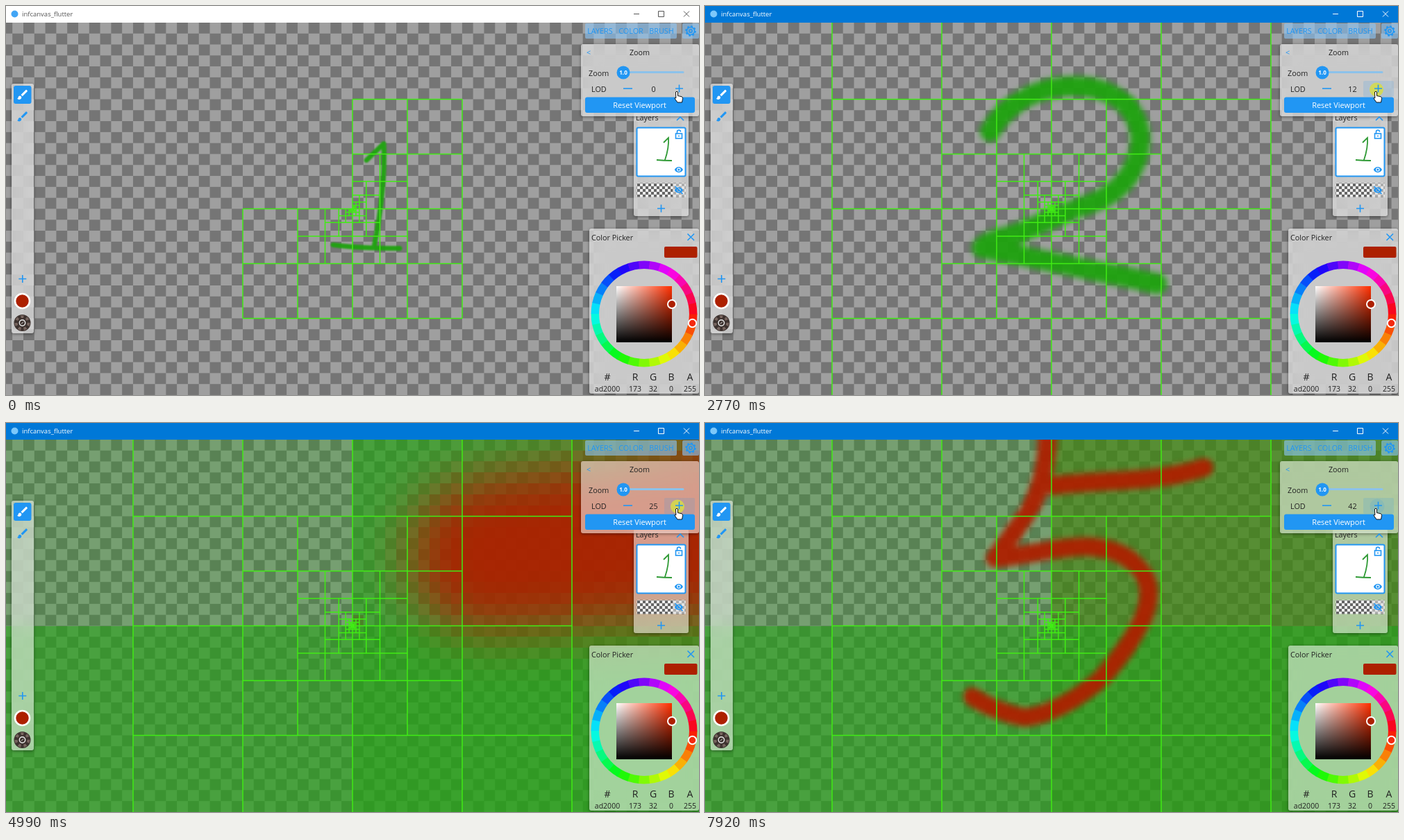
Write an HTML page with a canvas that moves like this. It is 998 px wide and 561 px high and loops after 7990 ms.

```html
<!DOCTYPE html>
<html>
<head>
<meta charset="utf-8">
<style>
html, body { margin: 0; width: 100%; height: 100%; overflow: hidden; }
body { position: relative; font-family: "Open Sans", sans-serif; }
body > * { position: absolute; }
#view {
  left: 0; top: 24px;
  background: repeating-conic-gradient(#757575 0 25%, #9f9f9f 0 50%) 25px 15.7px / 31.6px 31.6px;
}
.panel {
  background: rgba(255, 255, 255, .54); backdrop-filter: blur(14px);
  border-radius: 3px; box-shadow: 0 1px 4px rgba(0, 0, 0, .45);
}
.tab { background: rgba(142, 200, 250, .6); border-radius: 2px; }
#square {
  left: 879px; top: 404px; width: 80px; height: 81px;
  background: linear-gradient(transparent, #000), linear-gradient(90deg, #fff, #ff2f00);
}
#ui { left: 0; top: 0; }
.line { fill: none; stroke: #2196f3; stroke-width: 1.6; }
.blue { fill: #2196f3; }
.mid { text-anchor: middle; }
</style>
</head>
<body>
<canvas id="view" width="998" height="537"></canvas>
<div class="panel" style="left:904px;top:153px;width:79px;height:150px"></div>
<div class="panel" style="left:828px;top:55px;width:170px;height:104px"></div>
<div class="panel" style="left:840px;top:321px;width:158px;height:238px"></div>
<div class="panel" style="left:8px;top:112px;width:32px;height:360px"></div>
<div class="tab" style="left:834px;top:25px;width:132px;height:22px"></div>
<div class="tab" style="left:974px;top:25px;width:24px;height:22px"></div>
<div id="square"></div>

<svg id="ui" width="998" height="561" font-size="10.8" fill="#222">
  <defs>
    <path id="brush" d="M7 14c-1.7 0-3 1.3-3 3 0 1.3-1.2 2-2 2 .9 1.2 2.5 2 4 2 2.2 0 4-1.8 4-4 0-1.7-1.3-3-3-3zm13.7-9.4l-1.3-1.3c-.4-.4-1-.4-1.4 0L9 12.2 11.8 15l9-9c.3-.4.3-1-.1-1.4z"/>
    <path id="eye" fill-rule="evenodd" d="M12 4.5C7 4.5 2.7 7.6 1 12c1.7 4.4 6 7.5 11 7.5s9.300-3.100 11-7.500C21.300 7.600 17 4.500 12 4.500zM12 17a5 5 0 1 1 0-10 5 5 0 0 1 0 10zm0-8a3 3 0 1 0 0 6 3 3 0 0 0 0-6z"/>
    <path id="plus" class="line" d="M-5.500 0h11M0-5.500v11"/>
    <pattern id="tiny" width="8" height="8" x="909" y="256" patternUnits="userSpaceOnUse">
      <path fill="#eee" d="M0 0h8v8H0z"/><path fill="#666" d="M0 0h4v4H0zM4 4h4v4H4z"/>
    </pattern>
  </defs>

  <rect id="bar" width="998" height="24"/>
  <circle id="logo" cx="12.500" cy="11.500" r="5"/>
  <g id="caption">
    <text x="23" y="15" font-size="9.500">infcanvas_flutter</text>
    <path fill="none" stroke="currentColor" d="M904 11.500h8M939.500 7.500h8v8h-8zM976 7.500l8 8m0-8l-8 8"/>
  </g>

  <g class="blue mid" font-size="10.800">
    <text x="855.500" y="40">LAYERS</text><text x="900" y="40">COLOR</text><text x="944" y="40">BRUSH</text>
  </g>
  <g class="line" transform="translate(986 36)">
    <circle r="5.500"/><circle r="2.200"/><circle r="6.800" stroke-width="2" stroke-dasharray="2.670"/>
  </g>

  <text class="blue" x="836" y="71">&lt;</text>
  <text class="mid" x="912.500" y="71">Zoom</text>
  <text x="839" y="100.500">Zoom</text>
  <path stroke="#8cc2ea" stroke-width="3" stroke-linecap="round" d="M892 95.500h83"/>
  <circle class="blue" cx="889" cy="96" r="9.500"/>
  <text class="mid" x="889" y="99" font-size="8" font-weight="700" fill="#fff">1.0</text>
  <text x="843" y="124">LOD</text>
  <path class="line" d="M889 119h13"/>
  <text id="lod" class="mid" x="932.500" y="124"></text>
  <rect id="hover" class="blue" x="948" y="108" width="44" height="23" rx="2" opacity=".14"/>
  <circle id="splash" class="blue" cx="968" cy="120" r="10.500" opacity=".13"/>
  <circle id="press" cx="967" cy="120.500" r="10" fill="#d8dc46" opacity=".85"/>
  <use href="#plus" x="969.500" y="119"/>
  <rect class="blue" x="834" y="131.500" width="158" height="22.500" rx="3"/>
  <text class="mid" x="912.500" y="147" fill="#fff" font-size="11">Reset Viewport</text>

  <svg x="904" y="159" width="79" height="20"><text x="3" y="5.500">Layers</text><path class="line" d="M62 6l5-5 5 5"/></svg>
  <rect x="908.500" y="175.500" width="70" height="70" rx="2" fill="#fff" stroke="#2196f3" stroke-width="2"/>
  <path fill="none" stroke="#2f9a35" stroke-width="1.800" d="M947 197l7-7q1 14-5 32M937 222q10 1 22 1"/>
  <g class="line" stroke-width="1.300"><rect x="964.500" y="184" width="9" height="7"/><path d="M966.500 184v-2.500a2.500 2.500 0 0 1 5 0M968 187.500h2"/></g>
  <use href="#eye" class="blue" transform="translate(962.300 229.500) scale(.55)"/>
  <rect x="908.500" y="255.500" width="70" height="20" fill="url(#tiny)"/>
  <rect x="960" y="256" width="18.500" height="19" fill="#ddd" opacity=".6"/>
  <use href="#eye" class="blue" transform="translate(962.300 259) scale(.55)"/>
  <path class="line" d="M963.500 260l11 11"/>
  <use href="#plus" x="943.500" y="292"/>

  <rect class="blue" x="11" y="115" width="25.500" height="26" rx="3"/>
  <use href="#brush" fill="#fff" transform="translate(14.500 118.500) scale(.78)"/>
  <use href="#brush" class="blue" transform="translate(14.500 150) scale(.78)"/>
  <use href="#plus" x="23.800" y="393.500"/>
  <circle cx="23.500" cy="425.500" r="10.500" fill="#ad2000" stroke="#fff" stroke-width="2.600"/>
  <circle cx="23.500" cy="457" r="12" fill="#3d322f"/>
  <circle cx="23.500" cy="457" r="9" fill="none" stroke="#77655f" stroke-width="4" stroke-dasharray="4"/>
  <circle cx="23.500" cy="457" r="4.200" fill="none" stroke="#eee" stroke-width="1.400"/>
  <path stroke="#eee" d="M22 458.500l3-3"/>

  <text x="843" y="338">Color Picker</text>
  <path class="line" d="M981.500 328.500l9.500 9.500m0-9.500l-9.500 9.500"/>
  <rect x="948" y="347" width="47.500" height="16" rx="2" fill="#ad2000"/>
  <g id="ring" fill="none" stroke-width="11.500"></g>
  <g stroke="#fff" stroke-width="2">
    <circle cx="988.500" cy="457.500" r="5.700" fill="#f42a10"/><circle cx="959" cy="430" r="6" fill="#ad2000"/>
  </g>
  <g class="mid" id="values"></g>

  <path fill="#fff" stroke="#111" d="M965 123.500q1.500-1.500 3 0v5.500l5.500 1.200q1.800.6 1.500 3l-1 5.300h-6.500l-4.200-6q.8-1.800 2 0z" transform="translate(-.5 .5)"/>
</svg>

<script>
const $ = id => document.getElementById(id);
const ctx = $("view").getContext("2d");
const CX = 499, CY = 268.5, TEXEL = .494, HALF = 210, LOOP = 7990;
const GREEN = "rgb(30,163,14)", RED = "rgb(173,32,0)";

// Each digit lives ten zoom levels below the previous one.
// core: opacity of the four texels touching the zoom centre.
const digits = [
  { level: 0, color: GREEN, width: 7, core: [0, 0, 0, 0],
    d: "M20-70L45-94C47-55 42 0 31 55M-28 52Q10 57 68 57" },
  { level: 10, color: GREEN, width: 7.4, core: [.31, .67, .66, .78],
    d: "M-22-28C-10-50 30-50 32-26C32-8 16-2 9.9-.5C4 1.500-8 8-15.600 9.900Q-22 11-25 14L38 27" },
  { level: 20, color: RED, width: 7, core: [0, .14, 0, .02],
    d: "M-16-43C5-52 44-55 45-32C45-14 25-5 6-3.200C24-5 38-4 38 14C36 30-5 35-37 36" },
  { level: 30, color: RED, width: 6.2, core: [0, 0, 0, 0],
    d: "M0-42C-4-34-6-26-8.800-16.800L-14.800 0L-21.500 16.800L-31 28Q10 27 55 22M37.500 3L39 52" },
  { level: 40, color: RED, width: 6.6, core: [0, 0, 0, 0],
    d: "M-1.500-72C-1-58-4-48-9-40L-20.300-24.400C-5-26 4-29 13-28.600C28-28 36-19 35-10C34 0 24 12 18 19C10 26-2 33-10 33Q-20 31-28.500 25.600M0-50.500C18-53 36-51 55-57" },
];

function paintTexture({ color, width, core, d }) {
  const canvas = document.createElement("canvas");
  canvas.width = canvas.height = HALF * 2;
  const c = canvas.getContext("2d");
  c.translate(HALF, HALF);
  c.save();
  c.scale(1 / TEXEL, 1 / TEXEL);
  c.lineCap = c.lineJoin = "round";
  c.strokeStyle = color;
  c.lineWidth = width;
  c.globalAlpha = .95;
  c.filter = "blur(2px)";
  c.stroke(new Path2D(d));
  c.restore();
  c.clearRect(-1, -1, 2, 2);
  c.fillStyle = color;
  core.forEach((alpha, i) => {
    c.globalAlpha = alpha;
    c.fillRect(i % 2 - 1, (i >> 1) - 1, 1, 1);
  });
  return canvas;
}
for (const digit of digits) digit.texture = paintTexture(digit);

function drawDigit({ level, texture }, lod) {
  if (lod < level - 7) return;
  const scale = TEXEL * 2 ** Math.min(lod - level, 11);
  ctx.imageSmoothingEnabled = scale < 1;
  ctx.imageSmoothingQuality = "high";
  ctx.drawImage(texture, HALF - CX / scale, HALF - CY / scale, 998 / scale, 537 / scale, 0, 0, 998, 537);
}

// Nested rings of tiles; one quadrant at a time, growing out to its limit.
function drawGrid(lod) {
  const outer = Math.min(316, 158 * 2 ** lod);
  const topLeft = Math.min(316, 39.5 * 2 ** (lod - 8));
  ctx.beginPath();
  for (const [sx, sy] of [[1, 1], [1, -1], [-1, 1], [-1, -1]]) {
    const line = (x1, y1, x2, y2) => {
      ctx.moveTo(CX + sx * x1, CY + sy * y1);
      ctx.lineTo(CX + sx * x2, CY + sy * y2);
    };
    const limit = sx + sy < 0 ? topLeft : outer;
    line(0, 0, limit, 0);
    line(0, 0, 0, limit);
    for (let h = limit; h > 1; h /= 2) {
      line(h, 0, h, h);
      line(0, h, h, h);
      line(h / 2, h / 2, h / 2, h);
      line(h / 2, h / 2, h, h / 2);
    }
  }
  ctx.strokeStyle = "#40ec14";
  ctx.lineWidth = 1.5;
  ctx.stroke();
}

// [ms, clicks]: a click is held during the second half of each unit.
const pace = [[200, .5], [2040, 8.6], [3180, 15.2], [3990, 20.2], [4990, 25.7], [6620, 34.7], [7990, 42.7]];
function clicksAt(t) {
  if (t < 200) return 0;
  const i = pace.findIndex(([end]) => t < end);
  const [t0, a] = pace[i - 1], [t1, b] = pace[i];
  return a + (b - a) * (t - t0) / (t1 - t0);
}

const show = (id, on) => $(id).style.display = on ? "" : "none";

function frame(now) {
  const t = now % LOOP, clicks = clicksAt(t), lod = Math.floor(clicks);
  const active = t >= 200, held = active && clicks % 1 >= .5;
  ctx.clearRect(0, 0, 998, 537);
  for (const digit of digits) drawDigit(digit, lod);
  drawGrid(lod);
  $("lod").textContent = lod;
  $("bar").style.fill = active ? "#0078d7" : "#fff";
  $("logo").style.fill = active ? "#7cc8fa" : "#42a5f5";
  $("caption").style.fill = $("caption").style.color = active ? "#fff" : "#555";
  show("hover", active);
  show("splash", active && !held);
  show("press", held);
  requestAnimationFrame(frame);
}

const STEP = 12;
for (let a = 0; a < 360; a += STEP) {
  const at = deg => [919 + 70.7 * Math.cos(deg * Math.PI / 180), 444 + 70.7 * Math.sin(deg * Math.PI / 180)];
  $("ring").innerHTML += `<path stroke="hsl(${a + STEP / 2} 95% 50%)" d="M${at(a)}A70.7 70.7 0 0 1 ${at(a + STEP + .4)}"/>`;
}
[["#", "ad2000", 866], ["R", 173, 906], ["G", 32, 932], ["B", 0, 958], ["A", 255, 985]].forEach(([name, value, x]) =>
  $("values").innerHTML += `<text x="${x}" y="540" font-size="14">${name}</text><text x="${x}" y="556" font-size="10.5">${value}</text>`);

requestAnimationFrame(frame);
</script>
</body>
</html>
```
